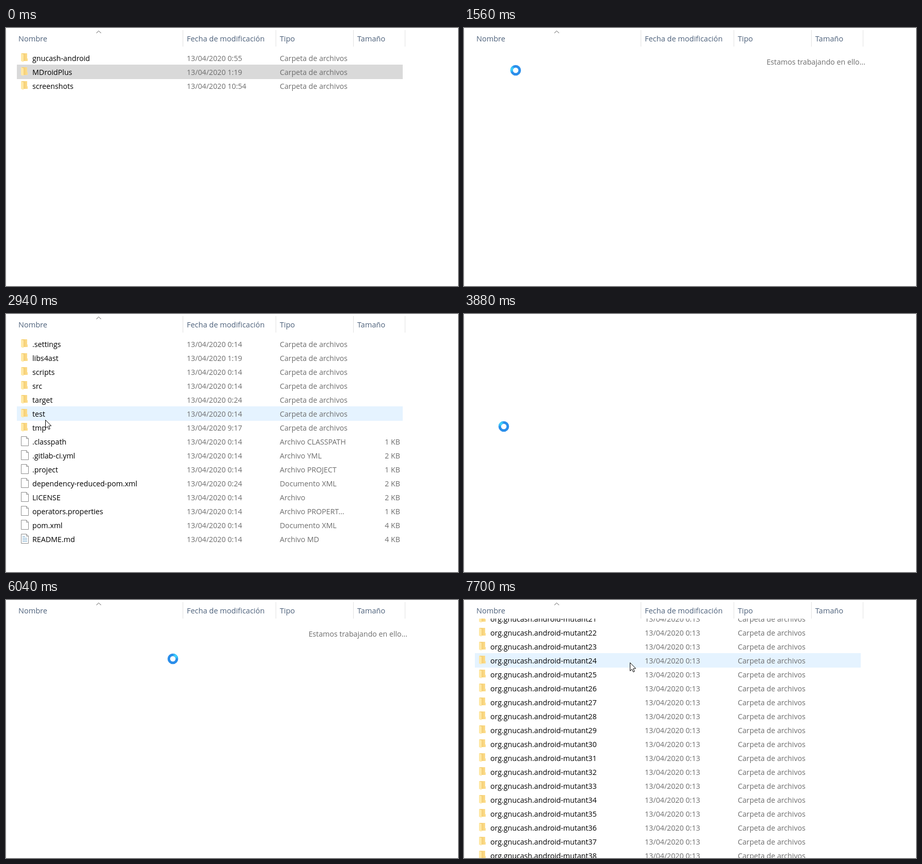
These frames come from a looping animation (875 by 500 pixels, 8000 ms). An HTML page with a canvas:

```html
<!DOCTYPE html>
<html lang="es">
<head>
<meta charset="utf-8">
<title>Explorador de carpetas</title>
<style>
html, body { margin: 0; width: 100%; height: 100%; overflow: hidden; background: #fff; }
canvas { display: block; width: 875px; height: 500px; }
</style>
</head>
<body>
<canvas id="stage" width="875" height="500"></canvas>
<script>
const ctx = document.getElementById('stage').getContext('2d');
const LOOP = 8000, TICK = 77.7;
const ROW = 27, TOP = 44, HEAD = 36;
const GREY = '#6d6d6d';
const font = size => `${size}px "Open Sans", "Noto Sans", sans-serif`;

const folder = (name, time = '0:14') => ({ name, time, type: 'Carpeta de archivos', icon: 'folder' });

function file(name, kb, time = '0:14') {
  const ext = name.includes('.') ? name.split('.').pop().toUpperCase() : '';
  const type = ext === 'XML' ? 'Documento XML' : ('Archivo ' + ext).trim();
  return {
    name, time, size: kb + ' KB',
    type: type.length > 17 ? type.slice(0, 15) + '...' : type,
    icon: ext === 'MD' ? 'note' : 'file'
  };
}

const home = [folder('gnucash-android', '0:55'), folder('MDroidPlus', '1:19'), folder('screenshots', '10:54')];
const project = [
  folder('.settings'), folder('libs4ast', '1:19'), folder('scripts'), folder('src'),
  folder('target', '0:24'), folder('test'), folder('tmp', '9:17'),
  file('.classpath', 1), file('.gitlab-ci.yml', 2), file('.project', 1),
  file('dependency-reduced-pom.xml', 2, '0:24'), file('LICENSE', 2),
  file('operators.properties', 1), file('pom.xml', 4), file('README.md', 4)
];
const tmp = [folder('mutants', '9:55')];
const mutants = Array.from({ length: 60 }, (_, i) => folder('org.gnucash.android-mutant' + (i + 1), '0:13'));

// Each scene lasts until the next one starts.
const scenes = [
  { at: 0, list: home, selected: 1 },
  { at: 1320, list: [] },
  { at: 1400, list: [], working: true },
  { at: 1630, list: project, selected: 6, clickAt: 3320 },
  { at: 3810, list: [], blank: true },
  { at: 4040, list: [], working: true },
  { at: 4190, list: tmp, selected: 0, clickAt: 5110 },
  { at: 5590, list: [] },
  { at: 5660, list: [], working: true },
  { at: 6120, list: mutants }
];

// Pointer moves, each easing out from where the last one ended
const moves = [
  { from: 70, to: 610, x: 100, y: 82 },
  { from: 2160, to: 2230, x: 98, y: 92 },
  { from: 2330, to: 2940, x: 76, y: 204 },
  { from: 2940, to: 3170, x: 77, y: 218 },
  { from: 4510, to: 4940, x: 96, y: 63 },
  { from: 5420, to: 6030, x: 323, y: 114 },
  { from: 6140, to: 6280, x: 321, y: 121 }
];
const waits = [
  { from: 1320, to: 1710, phase: 2.1 },
  { from: 3810, to: 4330, phase: 3.9 },
  { from: 5510, to: 6200, phase: 2.8 }
];
const clicks = [780, 940, 3320, 3560, 5110, 5350];
const wheel = [6590, 6680, 6830, 7230, 7610, 7610, 7700];

function pointerAt(t) {
  if (t < moves[0].from) return null;
  const q = Math.floor((t + 28) / TICK) * TICK;
  let x = 190, y = 306;
  for (const m of moves) {
    const p = Math.min(1, Math.max(0, (q - m.from) / (m.to - m.from)));
    const k = 1 - (1 - p) ** 1.6;
    x += (m.x - x) * k;
    y += (m.y - y) * k;
  }
  return { x: Math.round(x), y: Math.round(y) };
}

// Three rows per notch; the first notch also lines the list up with the header.
function scrollAt(t) {
  const notches = wheel.filter(at => at <= t).length;
  return notches && notches * 3 * ROW - 5;
}

function text(str, x, y, color, align = 'left') {
  ctx.fillStyle = color;
  ctx.textAlign = align;
  ctx.fillText(str, x, y);
}

function rect(x, y, w, h, color) {
  ctx.fillStyle = color;
  ctx.fillRect(x, y, w, h);
}

function poly(points, fill, stroke, close = true) {
  ctx.beginPath();
  points.forEach(([x, y]) => ctx.lineTo(x, y));
  if (close) ctx.closePath();
  if (fill) { ctx.fillStyle = fill; ctx.fill(); }
  if (stroke) { ctx.strokeStyle = stroke; ctx.lineWidth = 1; ctx.stroke(); }
}

function circle(x, y, r) {
  ctx.beginPath();
  ctx.arc(x, y, r, 0, Math.PI * 2);
}

function drawFolder() {
  const shade = ctx.createLinearGradient(3, 0, 13, 0);
  shade.addColorStop(0, '#f3cb6c');
  shade.addColorStop(1, '#fddf91');
  rect(1, 0, 11, 15, shade);
  rect(11, 10, 2, 5, shade);
  poly([[0, 0], [5, 2], [5, 17], [0, 15]], '#ffe8a6');
}

function drawFile(lines) {
  poly([[0.5, -0.5], [10.5, -0.5], [14.5, 3.5], [14.5, 17.5], [0.5, 17.5]], '#fff', '#8c8c8c');
  poly([[10.5, -0.5], [10.5, 3.5], [14.5, 3.5]], null, '#8c8c8c', false);
  for (let i = 0; i < lines; i++) rect(3, 4 + i * 3, i ? 9 : 5, 1, '#6fa3c8');
}

function drawIcon(kind, y) {
  ctx.save();
  ctx.translate(29, y + 5);
  if (kind === 'folder') drawFolder();
  else drawFile(kind === 'note' ? 4 : 0);
  ctx.restore();
}

function drawHeader() {
  ctx.font = font(14.5);
  let x = 24;
  for (const [label, edge] of [['Nombre', 342], ['Fecha de modificación', 522], ['Tipo', 672], ['Tamaño', 772]]) {
    text(label, x, 26, '#4c607a');
    rect(edge, 4, 1, 32, '#e2e2e2');
    x = edge + 8;
  }
  poly([[175, 10], [179.5, 5.5], [184, 10]], null, '#5a5a5a', false);
}

function drawRow(item, y, back) {
  if (back) rect(21, y, 747, 28, back);
  drawIcon(item.icon, y);
  const base = y + 20;
  text(item.name, 51, base, '#000');
  text('13/04/2020 ' + item.time, 350, base, GREY);
  text(item.type, 530, base, GREY);
  if (item.size) text(item.size, 763, base, GREY, 'right');
}

function drawList({ list, selected, clickAt = 0 }, t, pointer) {
  const scroll = scrollAt(t);
  const hover = pointer ? Math.floor((pointer.y - TOP + scroll) / ROW) : -1;
  ctx.save();
  ctx.beginPath();
  ctx.rect(0, HEAD, 875, 500 - HEAD);
  ctx.clip();
  list.forEach((item, i) => {
    const chosen = i === selected && t >= clickAt;
    const back = i === hover ? (chosen ? '#cce8ff' : '#e5f3ff') : chosen && '#d9d9d9';
    drawRow(item, TOP + i * ROW - scroll, back);
  });
  ctx.restore();
}

function drawSpinner(x, y, angle) {
  ctx.lineWidth = 5;
  circle(x, y, 7.8);
  ctx.strokeStyle = '#2b8eea';
  ctx.stroke();
  for (const [half, color] of [[0.7, '#33b5f5'], [0.35, '#3fd0fb']]) {
    ctx.beginPath();
    ctx.arc(x, y, 7.8, angle - half, angle + half);
    ctx.strokeStyle = color;
    ctx.stroke();
  }
}

function drawArrow(x, y) {
  ctx.save();
  ctx.translate(x + 0.5, y + 0.5);
  poly([[0, 0], [0, 16], [3.6, 12.6], [6.2, 18], [8.6, 17], [6.2, 11.5], [11, 11.2]], '#fff', '#000');
  ctx.restore();
}

function drawPointer(t, { x, y }) {
  if (clicks.some(at => t >= at && t < at + 85)) {
    circle(x, y, 15);
    ctx.fillStyle = 'rgba(255, 255, 0, 0.47)';
    ctx.fill();
  }
  const wait = waits.find(w => t >= w.from && t < w.to);
  if (wait) drawSpinner(x, y, wait.phase + Math.floor((t - wait.from) / TICK) * 0.45);
  else drawArrow(x, y);
}

function draw(t) {
  const scene = scenes.filter(s => s.at <= t).pop();
  const pointer = pointerAt(t);
  rect(0, 0, 875, 500, '#fff');
  rect(0, 4, 1, 496, '#f0f0f0');
  if (!scene.blank) drawHeader();
  ctx.font = font(14.2);
  if (scene.working) text('Estamos trabajando en ello...', 777, 71, GREY, 'right');
  drawList(scene, t, pointer);
  if (pointer) drawPointer(t, pointer);
}

const start = performance.now();
function frame() {
  draw((performance.now() - start) % LOOP);
  requestAnimationFrame(frame);
}
frame();
</script>
</body>
</html>
```
